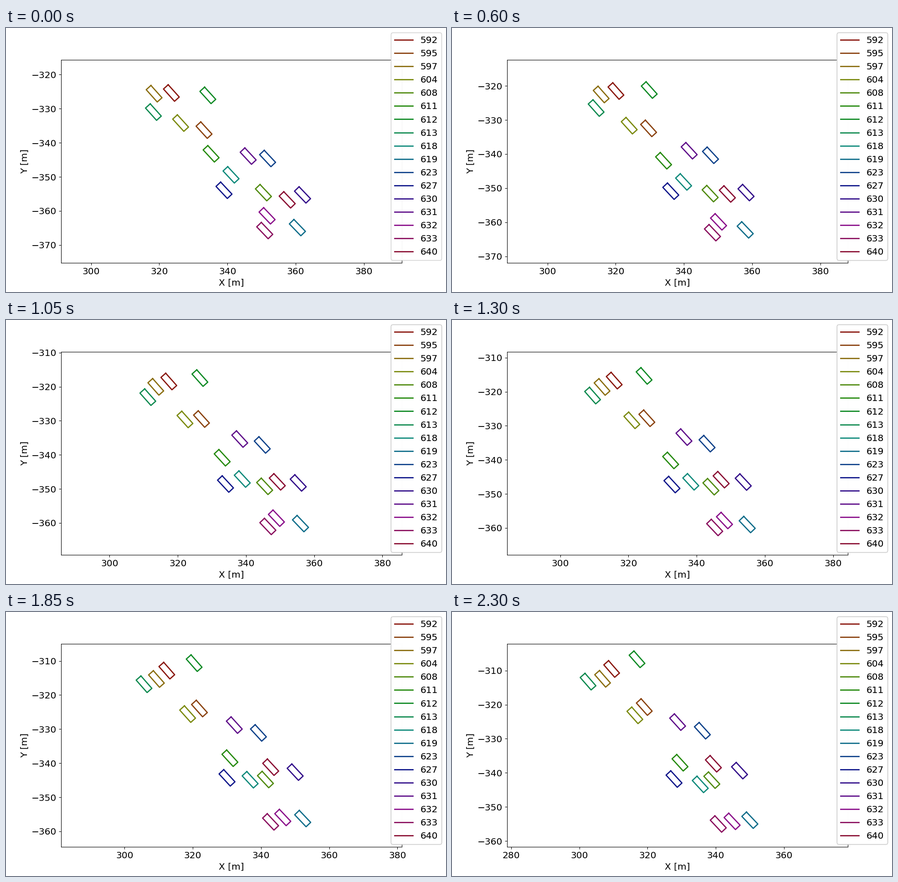
A matplotlib script that plays this animation: 966 px wide and 580 px high, repeating every 2350 ms.

```python
import colorsys

import numpy as np
import matplotlib.pyplot as plt
from matplotlib.animation import FuncAnimation
from matplotlib.lines import Line2D
from matplotlib.ticker import MultipleLocator

FRAMES, INTERVAL = 47, 50
WIDTH, HEIGHT, DPI = 966, 580, 100
VIEW = np.array([100, 100 * HEIGHT * 0.77 / (WIDTH * 0.775)])  # metres shown
LINE = 1.93
LAYERS = 5                       # translucent legends pile up

# The road: a gentle arc with five lanes, measured in metres.
ORIGIN = np.array([336.72, -351.12])
HEADING = np.radians(47)         # downwards to the right
BEND = 6.5e-4
LANE_WIDTH = 3.83
BOOST = (0.8, 2.4, 1.6, 0, 1.1)  # how late each lane gathers speed
LENGTH, BREADTH = 4.85, 1.87

# id: lane position, place along the road, distance driven in one loop
CARS = {
    592: (2, -27.8, 21.2),
    595: (1.94, -13.3, 21),
    597: (0.98, -31.1, 17.6),
    604: (0.98, -19.5, 14.9),
    608: (2, 12, 17.1),
    611: (1.11, -6.8, 8.4),
    612: (3.95, -20, 26),
    613: (0, -27.3, 23.7),
    618: (1.13, 1.7, 8.2),
    619: (2.03, 26.3, 15.2),
    623: (4.03, 5.5, 23.1),
    627: (-0.07, 3.6, 16.5),
    630: (4.05, 20.3, 21.9),
    631: (3.07, 1.1, 25.5),
    632: (0.98, 17.7, 9.9),
    633: (0.07, 20.4, 14.8),
    640: (2.94, 18.3, 26.6),
}


def turn(x, y, angle):
    """Rotate points clockwise."""
    c, s = np.cos(angle), np.sin(angle)
    return np.array([x * c + y * s, y * c - x * s])


def pose(car, p):
    """World position and heading after the share p of the loop."""
    lane, start, travel = car
    along = start - travel * p + BOOST[round(lane)] * p * (1 - p)
    across = lane * LANE_WIDTH + BEND * along ** 2 / 2
    return ORIGIN + turn(along, across, HEADING), HEADING - BEND * along


plt.rcParams.update({"font.family": "DejaVu Sans", "font.size": 14.5})
fig, ax = plt.subplots(figsize=(WIDTH / DPI, HEIGHT / DPI), dpi=DPI)
ax.set_xlabel("X [m]")
ax.set_ylabel("Y [m]")
ax.xaxis.set_major_locator(MultipleLocator(20))
ax.yaxis.set_major_locator(MultipleLocator(10))

lines, handles = [], []
for i, name in enumerate(CARS):
    color = colorsys.hls_to_rgb(i / len(CARS) + 0.01, 0.3, 0.8)
    lines += ax.plot([], [], color=color, lw=LINE)
    handles.append(Line2D([], [], color=color, lw=LINE, label=str(name)))

legends = [fig.legend(handles=handles, loc="upper right")
           for _ in range(LAYERS)]

BOX_X = np.array([-1, 1, 1, -1, -1]) * LENGTH / 2
BOX_Y = np.array([1, 1, -1, -1, 1]) * BREADTH / 2


def update(step):
    poses = [pose(car, step / (FRAMES - 1)) for car in CARS.values()]
    for line, (spot, heading) in zip(lines, poses):
        line.set_data(turn(BOX_X, BOX_Y, heading) + spot[:, None])

    # the view follows the middle of the traffic
    center = np.mean([spot for spot, _ in poses], axis=0)
    low, high = center - VIEW / 2, center + VIEW / 2
    ax.set_xlim(low[0], high[0])
    ax.set_ylim(low[1], high[1])

    for i, legend in enumerate(legends):
        legend.set_visible(i < step + 2)
    return []


anim = FuncAnimation(fig, update, frames=FRAMES, interval=INTERVAL,
                     init_func=lambda: update(0), repeat=True, repeat_delay=0)
plt.show()
```
